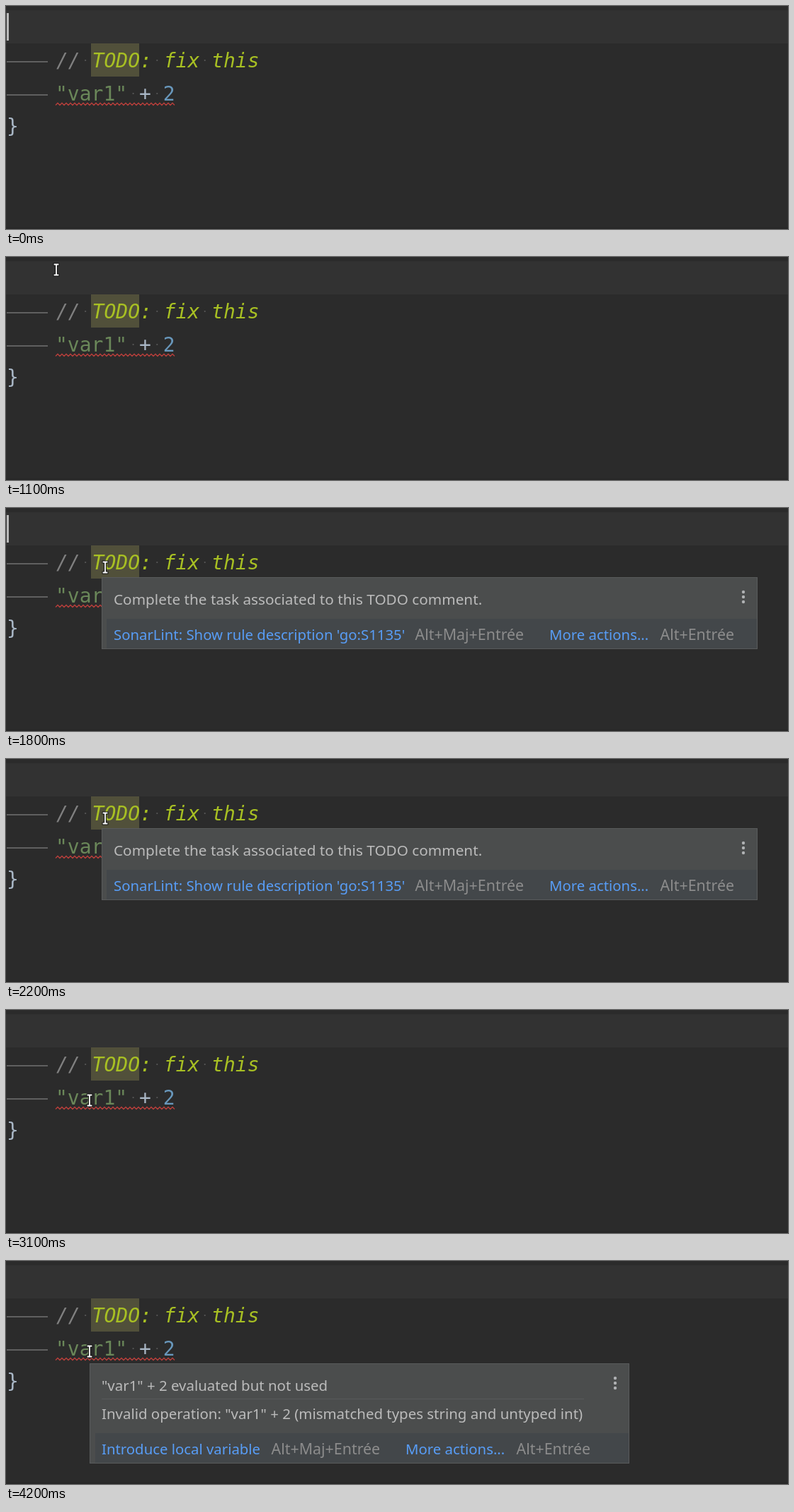
Write an HTML page that moves like this. It is 1104 by 316 pixels and loops after 4.7 s.

```html
<!DOCTYPE html>
<html lang="en">
<head>
<meta charset="utf-8">
<title>Editor inspection popups</title>
<style>
  html, body { margin: 0; width: 100%; height: 100%; overflow: hidden; background: #2b2b2b; }
  svg { display: block; width: 1104px; height: 316px; }
  .code { font: 28px "DejaVu Sans Mono", monospace; fill: #a9b7c6; }
  .todo { font-style: italic; fill: #a8c023; }
  .slashes { fill: #808080; }
  .string { fill: #6a8759; }
  .number { fill: #6897bb; }
  .body, .link, .hint { font-family: "Noto Sans", sans-serif; }
  .body { font-size: 20.45px; fill: #bbb; }
  .link { font-size: 20.35px; fill: #589df6; }
  .hint { font-size: 21.4px; fill: #8c8c8c; }
  .lead { font-size: 20.75px; }
  .panel { fill: #4b4d4d; stroke: #595b5c; }
  .footer { fill: #43474a; }
  .kebab { fill: #afb1b3; }
</style>
</head>
<body>
<svg viewBox="0 0 1104 316" xmlns="http://www.w3.org/2000/svg">
  <rect width="1104" height="316" fill="#2b2b2b"/>
  <rect y="6" width="1104" height="47" fill="#323232"/>
  <rect y="314" width="1104" height="2" fill="#262626"/>
  <rect x="120" y="53" width="68" height="47" fill="#51503a"/>
  <path d="M1 79H59M1 126H59" stroke="#606060" stroke-width="2"/>
  <g id="spaces" fill="#5a5a5a"></g>
  <g class="code">
    <text class="todo" x="71" y="87"><tspan class="slashes">//</tspan> TODO: fix this</text>
    <text x="70" y="134"><tspan class="string">"var1"</tspan> + <tspan class="number">2</tspan></text>
    <text x="1" y="180">}</text>
  </g>
  <path id="squiggle" fill="none" stroke="#bc3f3c" stroke-width="1.3"/>
  <rect id="caret" x="1" y="10" width="3" height="39" fill="#bbb"/>

  <g id="taskPopup">
    <rect class="panel" x="135.5" y="98.5" width="925" height="101"/>
    <rect class="footer" x="142" y="157" width="918" height="42"/>
    <text class="body lead" x="152" y="137">Complete the task associated to this TODO comment.</text>
    <text class="link" x="152" y="187">SonarLint: Show rule description 'go:S1135'</text>
    <text class="hint" x="577.5" y="187">Alt+Maj+Entrée</text>
    <text class="link" x="767" y="187">More actions...</text>
    <text class="hint" x="923.5" y="187">Alt+Entrée</text>
    <g class="kebab" data-x="1041" data-y="126"></g>
  </g>

  <g id="errorPopup">
    <rect class="panel" x="118.5" y="145.5" width="761" height="141"/>
    <rect class="footer" x="126" y="244" width="753" height="42"/>
    <path d="M135 195.5H816" stroke="#57595b"/>
    <text class="body" x="135" y="184">"var1" + 2 evaluated but not used</text>
    <text class="body" x="135" y="224">Invalid operation: "var1" + 2 (mismatched types string and untyped int)</text>
    <text class="link" x="135" y="274">Introduce local variable</text>
    <text class="hint" x="374.5" y="274">Alt+Maj+Entrée</text>
    <text class="link" x="564" y="274">More actions...</text>
    <text class="hint" x="720.5" y="274">Alt+Entrée</text>
    <g class="kebab" data-x="860" data-y="173"></g>
  </g>

  <g id="pointer" fill="none" stroke-linecap="square">
    <path d="M-2.5-7.5H2.5M0-7.5V7.5M-2.5 7.5H2.5" stroke="#111" stroke-width="3.8"/>
    <path d="M-2.5-7.5H2.5M0-7.5V7.5M-2.5 7.5H2.5" stroke="#fff" stroke-width="1.8"/>
  </g>
</svg>
<script>
  const LOOP = 4700, STEP = 100, CELL = 16.86;
  const byId = id => document.getElementById(id);
  const caret = byId('caret'), pointer = byId('pointer');
  const taskPopup = byId('taskPopup'), errorPopup = byId('errorPopup');

  // The caret is on at the start and flips at each of these times.
  const blinks = [100, 600, 1100, 1600, 2200, 2600, 3100, 3700, 4200];

  // Pointer path: time, x, y.
  const path = [
    [500, 93, -12], [1100, 71, 18], [1700, 140, 84],
    [2500, 140, 84], [2900, 121, 117], [3100, 118, 128]
  ];

  const dot = (x, y, r) => `<circle cx="${x}" cy="${y}" r="${r}"/>`;

  function build() {
    const gaps = [[2, 77], [8, 77], [12, 77], [6, 124], [8, 124]];
    byId('spaces').innerHTML =
      gaps.map(([col, y]) => dot(70 + (col + 0.5) * CELL, y, 1.1)).join('');

    let d = 'M70 140.5';
    for (let i = 1; i <= 56; i++) d += `L${70 + 3 * i} ${i % 2 ? 137.5 : 140.5}`;
    byId('squiggle').setAttribute('d', d);

    for (const g of document.querySelectorAll('.kebab')) {
      const x = +g.dataset.x, y = +g.dataset.y;
      g.innerHTML = [-7, 0, 7].map(dy => dot(x, y + dy, 2.2)).join('');
    }
  }

  function pointerAt(t) {
    const next = path.findIndex(p => p[0] > t);
    if (next === 0) return path[0].slice(1);
    if (next < 0) return path[path.length - 1].slice(1);
    const [t0, x0, y0] = path[next - 1], [t1, x1, y1] = path[next];
    const k = (t - t0) / (t1 - t0);
    return [x0 + (x1 - x0) * k, y0 + (y1 - y0) * k];
  }

  const show = (el, on) => el.setAttribute('visibility', on ? 'visible' : 'hidden');

  function draw(time) {
    const t = Math.floor((time % LOOP) / STEP) * STEP;
    const [x, y] = pointerAt(t);
    pointer.setAttribute('transform', `translate(${Math.round(x)} ${Math.round(y)})`);
    show(caret, blinks.filter(b => b <= t).length % 2 === 0);
    show(taskPopup, t >= 1800 && t < 3000);
    show(errorPopup, t >= 3200);
  }

  build();
  const start = performance.now();
  function tick() {
    draw(performance.now() - start);
    requestAnimationFrame(tick);
  }
  tick();
</script>
</body>
</html>
```
